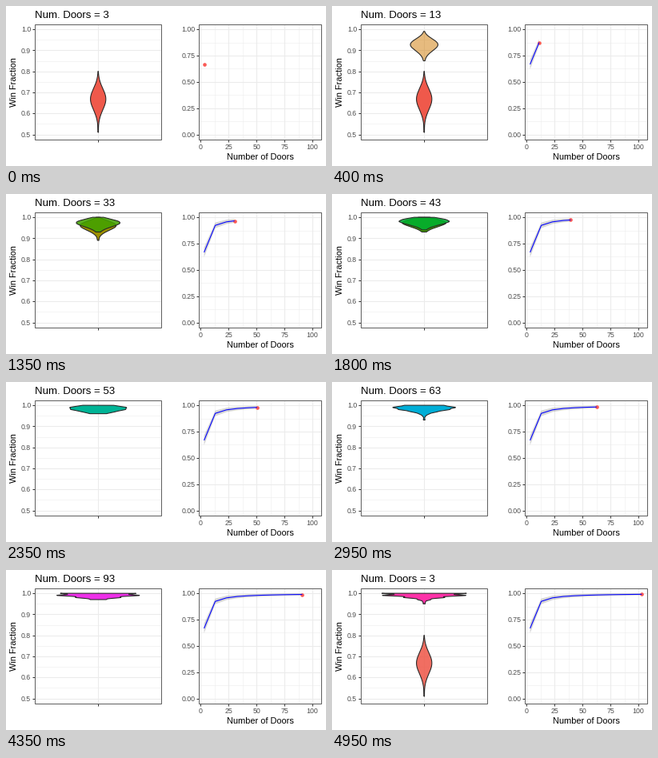
Recreate the animation shown at these times as a matplotlib script. Size 400 by 200 pixels, loop 5000 ms.

```python
from math import ceil, comb

import numpy as np
import matplotlib.pyplot as plt
from matplotlib.animation import FuncAnimation
from matplotlib.patches import Rectangle

W, H, DPI = 400, 200, 100
FRAMES, INTERVAL = 100, 50
PX = 72 / DPI  # points per pixel
plt.rcParams["font.family"] = "Liberation Sans"

TOP, BOTTOM = 22.9, 167.2
LEFT = (36, 194)
RIGHT = (241, 394)
CENTRE = 115.2
GRID, TICK, LABEL = "#ebebeb", "#333333", "#4d4d4d"

DOORS = np.arange(3, 104, 10)
GAMES = 100  # games per win fraction
RUNS = 100   # win fractions per violin
WORST = [49, 15, 11, 7, 6, 4, 7, 5, 7, 3, 5]  # most games lost in a run
DENSITY_PX = 1.22

WIN = 1 - 1 / DOORS
SPREAD = np.sqrt(WIN * (1 - WIN) / GAMES)


def y_left(v):
    return 160.6 - (np.asarray(v) - .5) / .5 * 131.5


def y_right(v):
    return 160.6 - np.asarray(v) * 131.5


def x_right(v):
    return 243.4 + np.asarray(v) * 1.397


def hue_color(i, chroma=120, light=58):
    """Evenly spaced hue on the polar LUV wheel, as sRGB."""
    h = np.radians(15 + 360 * i / len(DOORS))
    u = .19784 + chroma * np.cos(h) / (13 * light)
    v = .46834 + chroma * np.sin(h) / (13 * light)
    y = ((light + 16) / 116) ** 3
    x, z = y * 9 * u / (4 * v), y * (12 - 3 * u - 20 * v) / (4 * v)
    rgb = np.clip([3.2406 * x - 1.5372 * y - .4986 * z,
                   -.9689 * x + 1.8758 * y + .0415 * z,
                   .0557 * x - .2040 * y + 1.0570 * z], 0, 1)
    return np.where(rgb > .0031308, 1.055 * rgb ** (1 / 2.4) - .055,
                    12.92 * rgb)


def density(i):
    """Kernel density of the win fraction, trimmed to the runs' range."""
    p, sd, worst = 1 / DOORS[i], SPREAD[i], WORST[i]
    best = max(0, ceil(GAMES * (p - 2.85 * sd)))
    lost = np.arange(best, worst + 1)
    weight = np.array([comb(GAMES, k) * p ** k * (1 - p) ** (GAMES - k)
                       for k in lost.tolist()])
    weight[-1] = max(weight[-1], 1 / RUNS)
    weight /= weight.sum()
    wins = 1 - lost / GAMES
    v = np.linspace(wins[-1], wins[0], 160)
    width = .9 * sd * RUNS ** -.2
    kernel = np.exp(-.5 * ((v[:, None] - wins) / width) ** 2)
    return v, kernel @ weight / (width * np.sqrt(2 * np.pi))


fig = plt.figure(figsize=(W / DPI, H / DPI), dpi=DPI, facecolor="white")
ax = fig.add_axes([0, 0, 1, 1])
ax.set_xlim(0, W)
ax.set_ylim(H, 0)
ax.axis("off")


def line(xs, ys, color, width, z):
    return ax.plot(xs, ys, color=color, lw=width * PX, zorder=z,
                   solid_capstyle="butt")[0]


def text(x, y, s, size, color="black", **kw):
    return ax.text(x, y, s, fontsize=size * PX, color=color, **kw)


def hgrid(span, y, width):
    line(span, (y, y), GRID, width, 1)


def vgrid(x, width):
    line((x, x), (TOP, BOTTOM), GRID, width, 1)


def y_tick(edge, y, label):
    line((edge - 2.8, edge), (y, y), TICK, 1, 2)
    text(edge - 4.8, y + 3.1, label, 8.8, LABEL, ha="right")


def x_tick(x):
    line((x, x), (BOTTOM, BOTTOM + 2.8), TICK, 1, 2)


def y_axis(span, to_y, start, step, digits):
    for v in np.arange(start, 1.01, step):
        hgrid(span, to_y(v), 1.07)
        y_tick(span[0], to_y(v), f"{v:.{digits}f}")
    for v in np.arange(start + step / 2, 1, step):
        hgrid(span, to_y(v), .53)
    ax.add_patch(Rectangle((span[0], TOP), span[1] - span[0], BOTTOM - TOP,
                           fill=False, ec="#606060", lw=PX, zorder=8))


def draw_axes():
    y_axis(LEFT, y_left, .5, .1, 1)
    y_axis(RIGHT, y_right, 0, .25, 2)
    vgrid(CENTRE, 1.07)
    x_tick(CENTRE)
    for v in range(0, 101, 25):
        vgrid(x_right(v), 1.07)
        x_tick(x_right(v))
        text(x_right(v), 179.2, str(v), 8.8, LABEL, ha="center")
    for v in np.arange(12.5, 100, 25):
        vgrid(x_right(v), .53)
    text(13.5, 94.7, "Win Fraction", 11, rotation=90, ha="center",
         va="baseline", rotation_mode="anchor")
    text(317.6, 192, "Number of Doors", 11, ha="center")


def make_violin(i):
    v, dens = density(i)
    half, ys = dens * DENSITY_PX, y_left(v)
    xs = np.r_[CENTRE - half, CENTRE + half[::-1]]
    ys = np.r_[ys, ys[::-1]]
    z = 4 + i * .05
    fill = ax.fill(xs, ys, color=hue_color(i), lw=0, zorder=z)[0]
    edge = line(np.r_[xs, xs[0]], np.r_[ys, ys[0]], "#262626", 1.07, z + .02)
    return fill, edge


draw_axes()
violins = [make_violin(i) for i in range(len(DOORS))]
title = text(35.8, 15, "", 13.2)
ribbon = ax.fill([0], [0], color="#999999", alpha=.4, lw=0, zorder=3)[0]
dot = ax.plot([], [], "o", color="#fa5a55", ms=4.6 * PX, mew=0, zorder=5)[0]
curve = line([], [], "blue", 1.07, 6)


def show_violins(alphas):
    for i, (fill, edge) in enumerate(violins):
        fill.set_visible(i in alphas)
        edge.set_visible(i in alphas)
        fill.set_alpha(alphas.get(i, 1))


def ease(t):
    return 2 * t * t if t < .5 else 1 - 2 * (1 - t) ** 2


def update(n):
    # Each state rests, then the next one fades in over it.
    state, step = divmod(max(n - 1, 0), 9)
    following = (state + 1) % len(DOORS)
    t = max(step - 5, 0) / 4
    alphas = {state: 1}
    if t > 0:
        alphas[following] = ease(t)
    show_violins(alphas)
    title.set_text(f"Num. Doors = {DOORS[following if t >= .5 else state]}")

    # The curve is revealed at a steady pace.
    head = 3 + 100 * n / (FRAMES - 1)
    xs = np.r_[DOORS[DOORS < head], head]
    mean = np.interp(xs, DOORS, WIN)
    sd = np.interp(xs, DOORS, SPREAD)
    px = x_right(xs)
    curve.set_data(px, y_right(mean))
    dot.set_data(px[-1:], y_right(mean[-1:]))
    ribbon.set_xy(np.c_[np.r_[px, px[::-1]],
                        np.r_[y_right(mean + sd), y_right(mean - sd)[::-1]]])
    return []


anim = FuncAnimation(fig, update, frames=FRAMES, interval=INTERVAL,
                     init_func=lambda: update(0), repeat=True)
plt.show()
```
